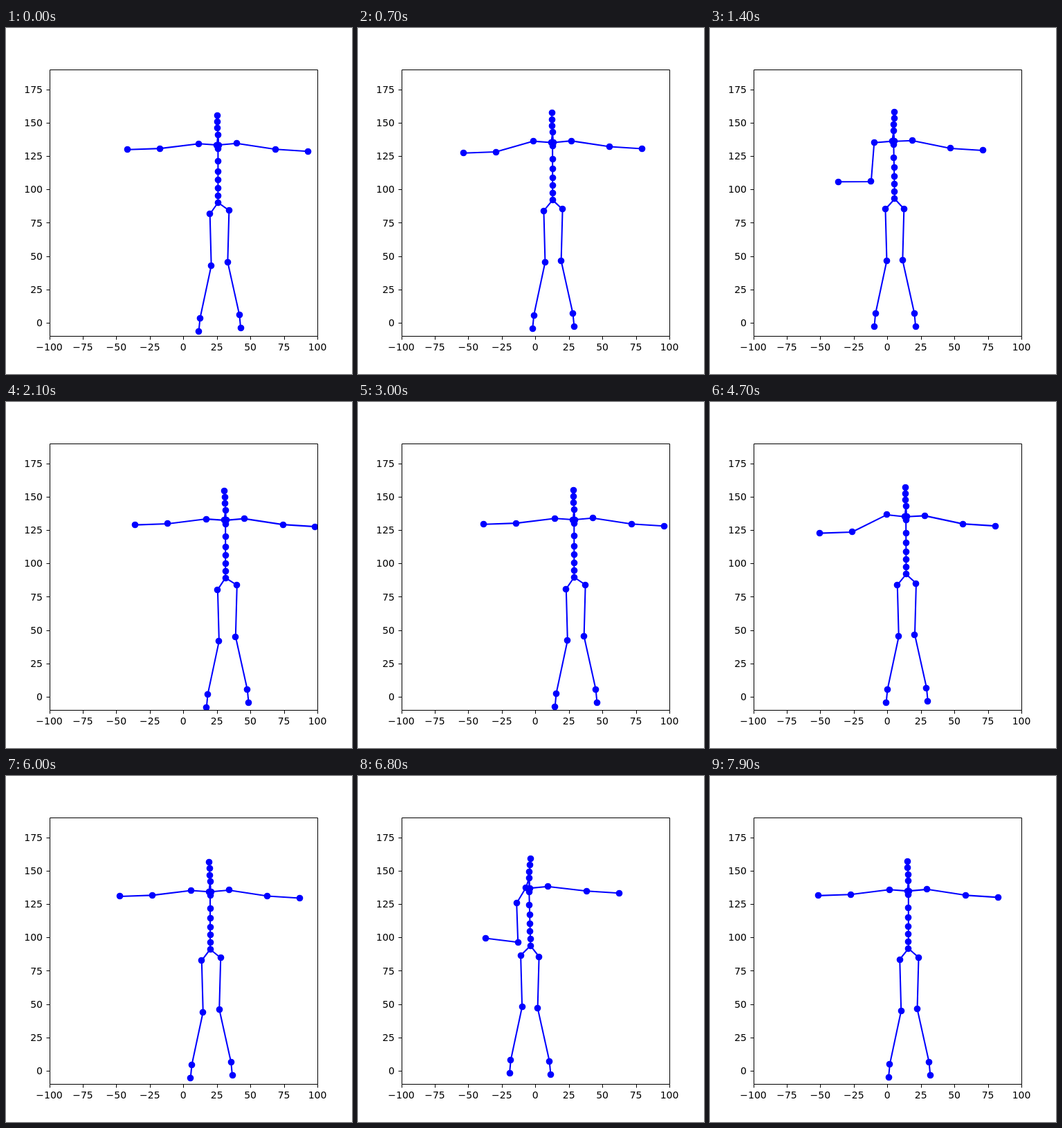
Recreate the animation shown at these times as an HTML page. Size 500 by 500 pixels, loop 8 s.

```html
<!DOCTYPE html>
<html lang="en">
<head>
<meta charset="utf-8">
<title>Skeleton plot</title>
<style>
html, body { margin: 0; width: 100%; height: 100%; overflow: hidden; background: #fff; }
svg { display: block; width: 500px; height: 500px; }
text { font: 14px "DejaVu Sans", sans-serif; }
.axis { fill: none; stroke: #000; }
#bones { fill: none; stroke: #00f; stroke-width: 2.08; stroke-linejoin: round; }
#joints { fill: none; stroke: #00f; stroke-width: 9.7; stroke-linecap: round; }
</style>
</head>
<body>
<svg viewBox="0 0 500 500">
  <clipPath id="area"><rect x="62.5" y="60" width="388" height="385.5"/></clipPath>
  <g clip-path="url(#area)"><path id="bones"/><path id="joints"/></g>
  <g id="axes"></g>
</svg>
<script>
const STEP = 100, COUNT = 80;
const $ = id => document.getElementById(id);
const label = v => String(v).replace('-', '\u2212');
const snap = v => Math.floor(v + 0.5) + 0.5;

function drawAxes() {
  let d = 'M63.5 60.5H450.5V445.5H63.5Z', texts = '';
  for (let v = -100; v <= 100; v += 25) {
    const x = 256.25 + v * 1.9375;
    d += `M${snap(x)} 445.5v5`;
    texts += `<text x="${x}" y="466" text-anchor="middle">${label(v)}</text>`;
  }
  for (let v = 0; v <= 175; v += 25) {
    const y = 425.75 - v * 1.925;
    d += `M63.5 ${snap(y)}h-5`;
    texts += `<text x="53" y="${Math.round(y + 5.2)}" text-anchor="end">${label(v)}</text>`;
  }
  $('axes').innerHTML = `<path class="axis" d="${d}"/>${texts}`;
}

const clamp = v => Math.min(1, Math.max(0, v));
const progress = (t, from, to) => clamp((t - from) / (to - from));
const ease = s => (1 - Math.cos(Math.PI * s)) / 2;

// Turning points of the sideways lean: [step, hip x].
const lean = [[0, 306.4], [13, 261.5], [18, 318], [30, 312.3], [40, 249.3],
  [49, 288], [60, 295], [68, 249.3], [74, 288], [79, 286.8]];
// Arm repetitions: [start, lowest, end].
const reps = [[6, 12, 18], [32, 41, 49], [63, 68, 73]];

function hipX(t) {
  const i = Math.max(1, lean.findIndex(([at]) => at >= t));
  const [t0, x0] = lean[i - 1], [t1, x1] = lean[i];
  return x0 + (x1 - x0) * ease(progress(t, t0, t1));
}

function armState(t) {
  const [start, low, end] = reps.find(rep => t <= rep[2]) || reps[2];
  const rise = progress(t, low, end);
  return {
    bend: ease(t < low ? progress(t, start, low) : 1 - rise),
    sway: Math.sin(Math.PI * rise)
  };
}

const move = ([x, y], dx, dy) => [x + dx, y + dy];
const swing = (p, length, degrees) => {
  const a = degrees * Math.PI / 180;
  return move(p, -length * Math.cos(a), length * Math.sin(a));
};

function pose(t) {
  const x = hipX(t), u = (x - 249) / 63;
  const hip = [x, 245.3 + 5 * u + 2.9 * u * u];
  const { bend, sway } = armState(t);
  const sag = bend ** 6, chest = -2 * bend, nod = 3.3 * bend - 1.3;

  const spine = [0, 10, 21, 32.3, 45, 59.3, 78].map(h => move(hip, chest * h / 78, -h));
  const neck = [98, 107.3, 116.5, 125.8].map((h, i) => move(hip, chest + nod * i / 3, -h));

  const collarL = move(hip, chest - 1.7 - 3 * sag, -83.2 - 0.6 * sag);
  const shoulderL = swing(collarL, 26, 63 * sag - 4 - 3 * sway);
  const elbowL = swing(shoulderL, 56.4, 7 + 85 * Math.sin(bend * Math.PI / 2));
  const handL = swing(elbowL, 47, 2 - 9 * sag);

  const drop = 8.5 + 5 * sway - 2 * bend;
  const collarR = move(hip, chest + 1, -83.2);
  const shoulderR = move(collarR, 26, 1.4 * sway - 2.3);
  const elbowR = move(shoulderR, Math.sqrt(3192 - drop * drop), drop);
  const handR = move(elbowR, 46.9, 3);

  const leg = (side, dx, dy, splay) => {
    const top = move(hip, dx, dy);
    return [hip, top, move(top, -2 * side, 74.5),
      move(top, splay * side, 151), move(top, (splay + 1.8) * side, 170)];
  };
  return [
    [...spine, ...neck],
    [neck[0], collarL, shoulderL, elbowL, handL],
    [neck[0], collarR, shoulderR, elbowR, handR],
    leg(-1, 2.7 * u - 14.2, 14 + 2.8 * u, 14.3),
    leg(1, 12.3 + 4 * u, 15.7 - 4.7 * u, 15)
  ];
}

const at = p => p.map(n => n.toFixed(2)).join(' ');
const pixel = p => p.map(n => Math.floor(n) + 0.5).join(' ');
let shown = -1;

function render(now) {
  const step = Math.floor(now / STEP) % COUNT;
  if (step === shown) return;
  shown = step;
  const chains = pose(step);
  $('bones').setAttribute('d', chains.map(c => 'M' + c.map(at).join('L')).join(''));
  $('joints').setAttribute('d', chains.flat().map(p => `M${pixel(p)}h0`).join(''));
}

const start = performance.now();
function tick() {
  render(performance.now() - start);
  requestAnimationFrame(tick);
}

drawAxes();
tick();
</script>
</body>
</html>
```
